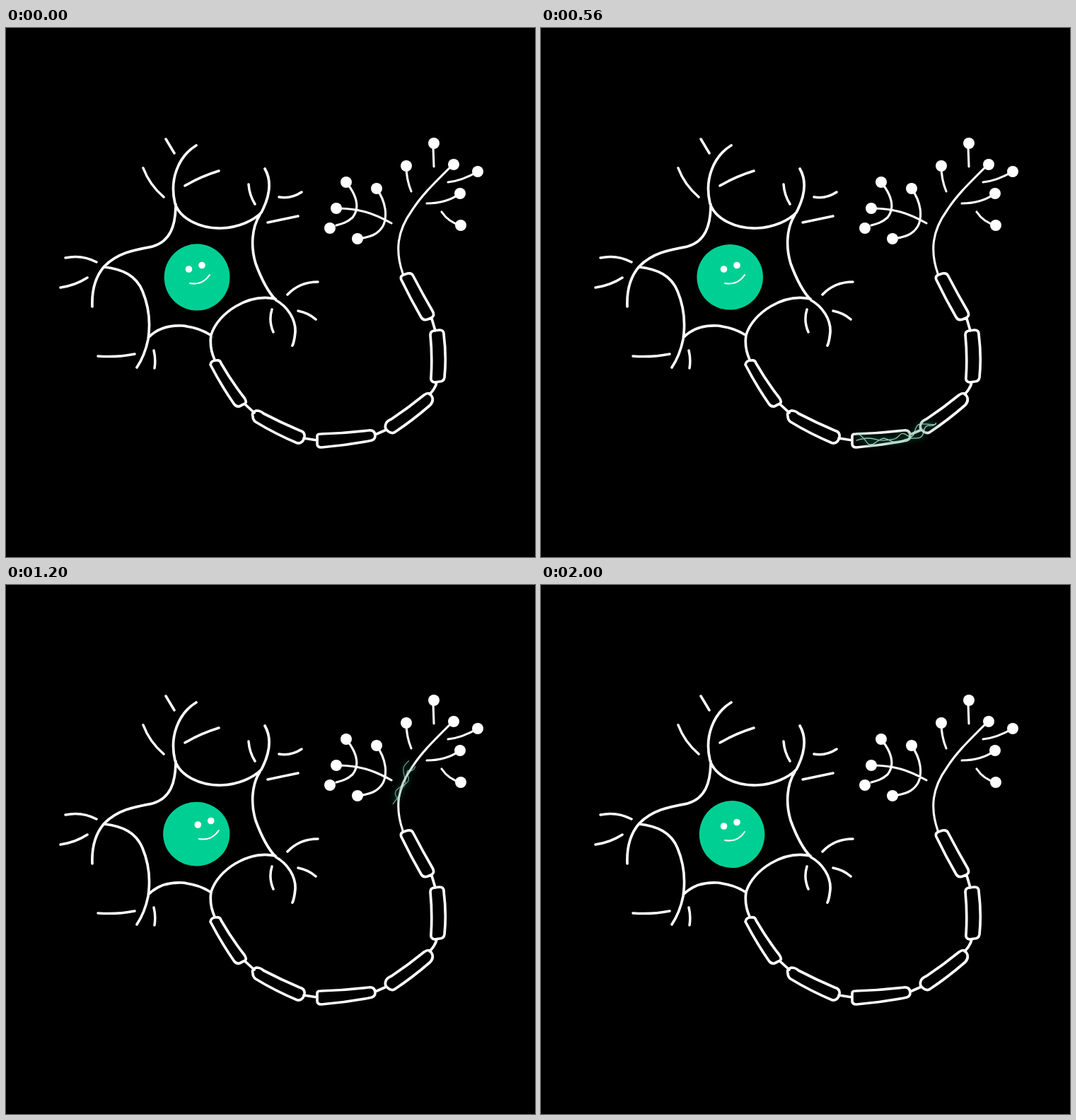
Animation of 748 by 748 pixels, one loop 2.04 s. Source, as an HTML page:

```html
<!DOCTYPE html>
<html lang="en">
<head>
<meta charset="utf-8">
<title>Neuron</title>
<style>
  html, body { margin: 0; height: 100%; background: #000; overflow: hidden; }
  svg { display: block; width: 100vw; height: 100vh; }
  path { fill: none; stroke: #fff; stroke-linecap: round; stroke-linejoin: round; }
  #bolt { stroke: #b4e6d0; stroke-width: 1.3; filter: drop-shadow(0 0 3px #0a7a56) drop-shadow(0 0 6px #064a35); }
  #halo { filter: blur(7px); }
  #aura { filter: blur(11px); }
</style>
</head>
<body>
<svg viewBox="0 0 748 748">
  <!-- cell body -->
  <path stroke-width="3.7" d="M269,166 C243,182 231,215 239,248 C246,270 275,284 305,283 C330,282 350,272 361,261 C372,240 377,218 366,199
    M240,249 C240,280 232,302 207,309 C180,314 158,318 139,337 C126,352 121,370 122,394
    M139,338 C165,341 184,350 193,372 C203,396 204,420 201,440 C198,455 193,468 185,480
    M202,437 C215,424 232,420 250,421 C268,423 280,428 289,434
    M359,264 C347,283 346,310 353,333 C360,352 370,373 382,385 C398,394 410,412 409,430 C408,440 407,445 405,449
    M381,383 C343,375 300,402 290,434 C288,447 290,458 295,469"/>
  <!-- loose dendrites -->
  <path stroke-width="3.5" d="M226,157 L238,177 M194,198 Q203,222 223,239 M253,223 Q275,210 301,202
    M343,221 Q344,236 352,249 M386,239 Q403,242 418,232 M370,275 L413,266
    M398,377 Q415,359 441,359 M413,400 Q428,403 438,412 M376,398 Q371,414 378,430
    M84,325 Q107,320 128,331 M77,367 Q98,364 115,353 M130,464 Q157,466 182,461 M209,456 Q212,468 210,481"/>
  <!-- myelin sheaths and the gaps between them -->
  <path stroke-width="3.7" d="M289,476 Q290,470 297,470 Q303,469 304,474 Q319,500 337,523 Q342,530 336,532 L330,535 Q325,536 322,531 Q304,505 289,476Z
    M349,549 Q347,543 354,541 Q360,541 364,545 Q389,558 415,569 Q423,571 422,578 Q420,588 412,587 Q381,574 353,557 Q349,554 349,549Z
    M440,577 Q440,574 445,574 Q480,573 513,569 Q522,568 522,577 Q522,583 513,584 Q480,590 446,593 Q440,593 440,588Z
    M537,560 Q538,556 545,553 Q569,537 591,519 Q598,514 601,519 Q606,526 600,533 Q576,554 549,572 Q544,574 539,569 Q535,566 537,560Z
    M600,434 Q600,429 605,428 L613,427 Q619,427 619,433 Q623,465 620,494 Q619,500 613,500 L606,501 Q600,500 601,494 Q603,464 600,434Z
    M559,356 Q557,351 562,349 L568,347 Q574,346 576,351 Q589,376 603,400 Q607,407 601,410 L596,412 Q590,414 587,409 Q572,383 559,356Z
    M338,532 L351,544 M421,580 L440,583 M522,575 L538,568 M599,518 Q607,510 609,501 M602,411 L607,428"/>
  <!-- axon terminals -->
  <path stroke-width="3.1" d="M561,347 C550,315 553,287 574,258 C588,236 606,219 632,193
    M604,168 L605,196 M566,195 Q566,214 573,231 M667,203 Q645,216 625,218 M642,234 Q623,248 595,248 M643,279 Q626,275 616,260
    M481,218 C497,238 500,255 490,268 C482,275 475,277 467,279
    M467,255 C500,255 520,262 545,276 M524,227 C540,250 538,270 533,280 C526,292 515,296 497,298"/>
  <g id="halo" fill="#fff"></g>
  <g id="dots" fill="#fff"></g>
  <ellipse id="aura" fill="#00d094"/>
  <ellipse id="nucleus"/>
  <g id="face" fill="#fff">
    <circle cx="258.5" cy="341" r="4.8"/>
    <circle cx="277" cy="335.5" r="4.8"/>
    <path stroke-width="2" d="M260,361 Q278,364 288,349"/>
  </g>
  <path id="bolt"/>
</svg>
<script>
const $ = id => document.getElementById(id);
const LOOP = 2040, TAU = 2 * Math.PI;

const ends = [[605, 163], [566, 195], [633, 193], [667, 203], [642, 234], [643, 279],
  [481, 218], [524, 227], [467, 255], [458, 283], [497, 298]];
const circles = r => ends.map(([x, y]) => `<circle cx="${x}" cy="${y}" r="${r}"/>`).join('');
$('dots').innerHTML = circles(8);
$('halo').innerHTML = circles(12);

const route = document.createElementNS('http://www.w3.org/2000/svg', 'path');
route.setAttribute('d', 'M290,434 C288,447 290,458 295,469 C305,500 320,520 340,536 C365,560 400,577 440,583 ' +
  'C480,584 520,580 550,563 C585,543 605,525 610,495 C614,465 612,440 600,410 ' +
  'C588,385 570,365 561,347 C550,315 553,287 574,258 C588,236 606,219 632,193');

const clamp = v => Math.max(0, Math.min(1, v));
const ease = v => { v = clamp(v); return v * v * (3 - 2 * v); };
const bump = (t, a, b) => Math.sin(Math.PI * clamp((t - a) / (b - a)));
const noise = n => { const v = Math.sin(n * 12.9898) * 43758.5453; return v - Math.floor(v); };

// Piecewise linear value through [time, value] keys
function track(t, keys) {
  const i = Math.max(1, keys.findIndex(k => k[0] >= t));
  const [t0, v0] = keys[i - 1], [t1, v1] = keys[i];
  return v0 + (v1 - v0) * clamp((t - t0) / (t1 - t0));
}

const headKeys = [[0, 12], [360, 225], [560, 357], [920, 585], [1200, 702], [LOOP, 702]];
const tailKeys = [[0, 4], [360, 106], [560, 235], [920, 500], [1200, 638], [1320, 700], [LOOP, 700]];

// Two loose strands that wander around the axon, rounded through midpoints
function boltPath(t) {
  const head = track(t, headKeys), tail = track(t, tailKeys);
  const steps = Math.max(3, Math.round((head - tail) / 11));
  const reach = Math.min(22, head - tail);
  let d = '';
  for (let strand = 0; strand < 2; strand++) {
    let last;
    for (let i = 0; i <= steps; i++) {
      const s = tail + (head - tail) * i / steps;
      const p = route.getPointAtLength(s), q = route.getPointAtLength(s + 1);
      const seed = Math.floor(t / 40) * 97 + strand * 31 + i;
      const off = (noise(seed) - 0.5) * reach, slip = (noise(seed + 0.5) - 0.5) * 8;
      const dx = q.x - p.x, dy = q.y - p.y;
      const x = p.x + dx * slip - dy * off, y = p.y + dy * slip + dx * off;
      d += last ? `Q${last} ${(last[0] + x) / 2},${(last[1] + y) / 2}` : `M${x},${y}`;
      last = [x, y];
    }
  }
  return d;
}

function setEllipse(el, cx, cy, rx, ry) {
  Object.entries({ cx, cy, rx, ry }).forEach(([k, v]) => el.setAttribute(k, v));
}

function draw(t) {
  // The nucleus breathes twice per loop
  const p = t / (LOOP / 2), squash = Math.sin(TAU * (p - 0.07));
  const cx = 268.6 + 1.5 * Math.cos(TAU * p), cy = 352.3 - 0.4 * squash;
  const rx = 46.7 + 0.7 * squash, ry = 46.4 - 1.7 * squash;
  const flash = bump(t, 0, 500);
  setEllipse($('nucleus'), cx, cy, rx, ry);
  setEllipse($('aura'), cx, cy, rx, ry);
  $('nucleus').setAttribute('fill', `rgb(${5 * flash},${207 + 14 * flash},${147 + 4 * flash})`);
  $('aura').style.opacity = 0.45 * flash * flash;

  const look = ease((t - 560) / 400) - ease((t - 1440) / 380);
  $('face').setAttribute('transform', `translate(${12.8 * look},${-2 * look})`);

  const on = t < 1320;
  $('bolt').style.opacity = on ? (0.2 + 0.65 * clamp(t / 120)) * clamp((1320 - t) / 160) : 0;
  if (on) $('bolt').setAttribute('d', boltPath(t));

  $('halo').style.opacity = 0.6 * bump(t, 1280, 1980);
}

function tick() {
  draw(performance.now() % LOOP);
  requestAnimationFrame(tick);
}
tick();
</script>
</body>
</html>
```
